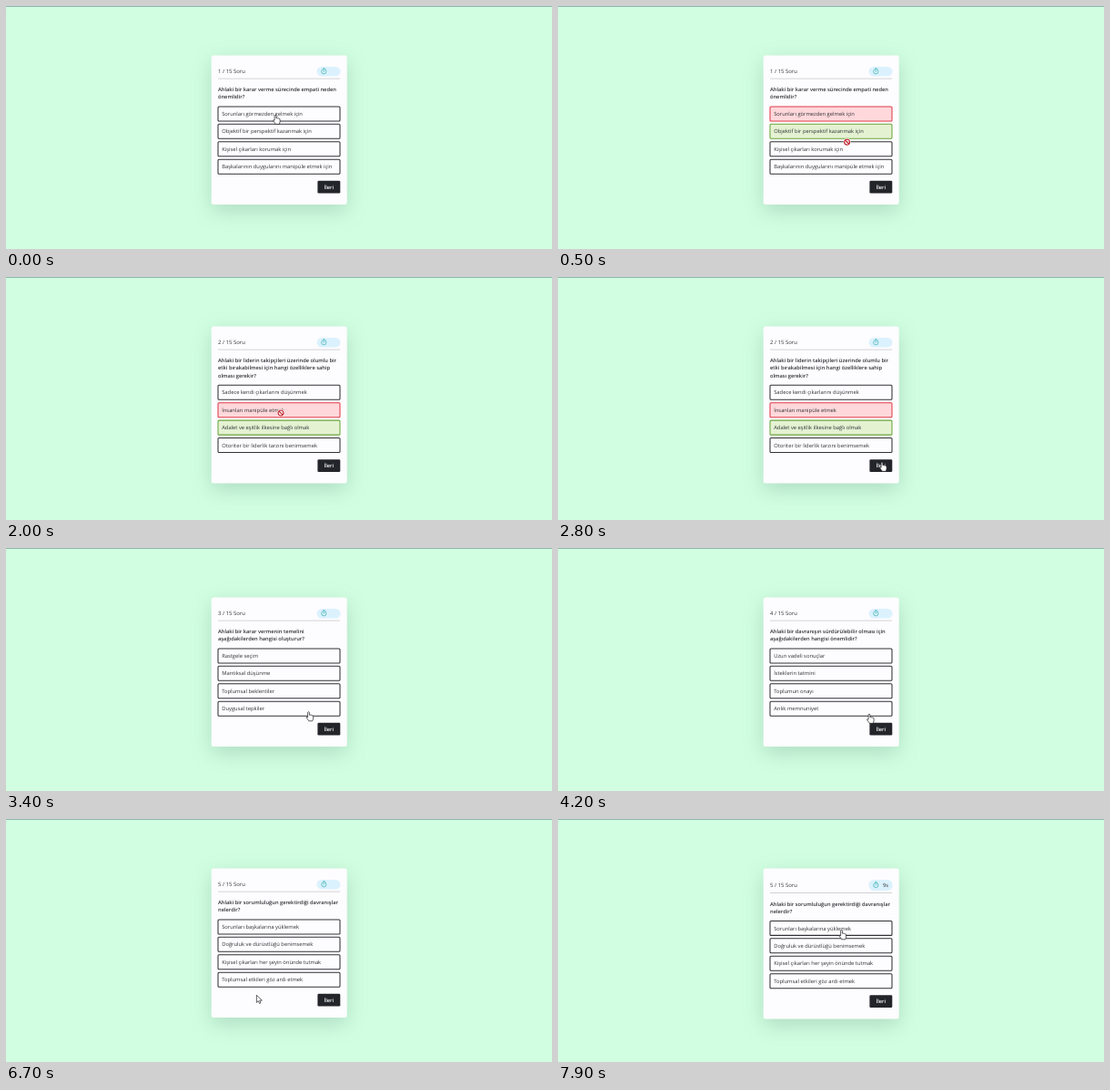
An HTML page that plays this animation: 600x268 px, repeating every 8000 ms.

```html
<!DOCTYPE html>
<html lang="tr">
<head>
<meta charset="utf-8">
<title>Soru</title>
<style>
  html, body { margin: 0; width: 100%; height: 100%; overflow: hidden; background: #d1fee1; }
  svg { display: block; width: 100%; height: 100%; }
  text { font: 5.8px 'Open Sans', 'Noto Sans', sans-serif; fill: #303136; text-rendering: geometricPrecision; }
  .bold { font-weight: 600; font-size: 5.73px; }
  .card { fill: #fdfcfe; filter: drop-shadow(0 7px 11px rgba(50, 100, 85, .21)); }
  .option { fill: #fdfcfe; stroke: #303136; stroke-width: 1.05; }
  .wrong { fill: #ffd8db; stroke: #e03b4a; }
  .right { fill: #e4f2d2; stroke: #6ba53d; }
  .button { fill: #24252b; }
  .cursor { fill: #fff; stroke: #1d1d22; stroke-width: .7; stroke-linejoin: round; }
  .blocked { fill: none; stroke: #c3272f; stroke-width: 1.2; }
  .halo { stroke: #fff; stroke-width: 2.2; }
  .watch { fill: none; stroke: #35aead; stroke-width: .7; }
</style>
</head>
<body>
<svg id="stage" viewBox="0 0 600 268"></svg>
<script>
const LOOP = 8000, STEP = 100;
const LEFT = 233, WIDTH = 134, LINE = 8.4, PITCH = 19.42, OPTION_HEIGHT = 16;
const BUTTON = { x: 342.4, w: 24.9, h: 13.8 };

// answered: time of the click; picked and correct: option indexes
const questions = [
  { start: 0, answered: 100, picked: 0, correct: 1,
    lines: ['Ahlaki bir karar verme sürecinde empati neden', 'önemlidir?'],
    options: ['Sorunları görmezden gelmek için', 'Objektif bir perspektif kazanmak için',
              'Kişisel çıkarları korumak için', 'Başkalarının duygularını manipüle etmek için'] },
  { start: 1400, answered: 2000, picked: 1, correct: 2,
    lines: ['Ahlaki bir liderin takipçileri üzerinde olumlu bir',
            'etki bırakabilmesi için hangi özelliklere sahip', 'olması gerekir?'],
    options: ['Sadece kendi çıkarlarını düşünmek', 'İnsanları manipüle etmek',
              'Adalet ve eşitlik ilkesine bağlı olmak', 'Otoriter bir liderlik tarzını benimsemek'] },
  { start: 2900, answered: 3700, picked: 1, correct: 1,
    lines: ['Ahlaki bir karar vermenin temelini', 'aşağıdakilerden hangisi oluşturur?'],
    options: ['Rastgele seçim', 'Mantıksal düşünme', 'Toplumsal beklentiler', 'Duygusal tepkiler'] },
  { start: 4100, answered: 4900, picked: 1, correct: 0,
    lines: ['Ahlaki bir davranışın sürdürülebilir olması için', 'aşağıdakilerden hangisi önemlidir?'],
    options: ['Uzun vadeli sonuçlar', 'İsteklerin tatmini', 'Toplumun onayı', 'Anlık memnuniyet'] },
  { start: 5900, answered: Infinity,
    lines: ['Ahlaki bir sorumluluğun gerektirdiği davranışlar', 'nelerdir?'],
    options: ['Sorunları başkalarına yüklemek', 'Doğruluk ve dürüstlüğü benimsemek',
              'Kişisel çıkarları her şeyin önünde tutmak', 'Toplumsal etkileri göz ardı etmek'] }
];

// The pointer travels between options and the button, easing at each stop.
const press = [356, 204];
const stops = [
  { t: 0, at: [296, 120] },
  { t: 1200, at: [353.5, 200] },
  { t: 1400, at: [353.5, 200] },
  { t: 1900, at: [302, 150] },
  { t: 2000, at: [302, 150] },
  { t: 2800, at: press },
  { t: 3400, at: [332.5, 180.5] },
  { t: 3700, at: [305, 138] },
  { t: 4100, at: press },
  { t: 4200, at: [342, 183] },
  { t: 4800, at: [250, 135] },
  { t: 5300, at: [368, 219] },
  { t: 5600, at: press },
  { t: 5900, at: press },
  { t: 6900, at: [266, 193] },
  { t: 7400, at: [311.5, 122.5] },
  { t: LOOP, at: [311.5, 122.5] }
];

function pointerAt(t) {
  const i = stops.findIndex(stop => stop.t > t);
  const from = stops[i - 1], to = stops[i];
  const u = (t - from.t) / (to.t - from.t), eased = u * u * (3 - 2 * u);
  return from.at.map((start, axis) => start + (to.at[axis] - start) * eased);
}

const rect = (x, y, w, h, r, attrs) =>
  `<rect x="${x}" y="${y}" width="${w}" height="${h}" rx="${r}" ${attrs}/>`;
const label = (x, y, s, attrs = '') => `<text x="${x}" y="${y}" ${attrs}>${s}</text>`;
const inside = (px, py, x, y, w, h) => px > x && px < x + w && py > y && py < y + h;

const noEntry = 'M-2.2-2.2L2.2 2.2M-3 0A3 3 0 1 0 3 0A3 3 0 1 0-3 0';
const cursors = {
  arrow: '<path class="cursor" d="M0 0V8.2L1.9 6.5L3.2 9.3L4.6 8.7L3.4 6H6Z"/>',
  hand: `<path class="cursor" d="M-.9 .7Q0-.6 .9 .7V3.7Q1.9 3 2.5 3.9Q3.4 3.4 4 4.3Q5.1 4 5.1 5.2
    V7.4Q5 9 4.2 10.3H.3Q-.8 8.4-2.4 6.7Q-2.7 5.2-.9 6.2Z"/>`,
  blocked: `<path class="blocked halo" d="${noEntry}"/><path class="blocked" d="${noEntry}"/>`
};

const stopwatch = y => `<g class="watch" transform="translate(349.3 ${y})">
  <circle r="2.6"/><path d="M0 .3V-1.5M-.9-3.6H.9M0-3.6V-2.6M2-2.5L2.6-3.1"/></g>`;

function header(index, ticks, shift) {
  return label(LEFT, 74.2 + shift / 2, `${index + 1} / 15 Soru`, 'style="font-size:5.95px"')
    + rect(341.5, 67, 26, 10.4 + shift, 5.5, 'fill="#dbf2fe"')
    + stopwatch(72.3 + shift / 2)
    + (ticks ? label(363, 75, `${11 - ticks}s`, 'text-anchor="end"') : '')
    + rect(LEFT, 79.7 + shift, WIDTH, .8, 0, 'fill="#c9c9ce"');
}

function scene(t) {
  const index = questions.findLastIndex(q => t >= q.start);
  const q = questions[index];
  const answered = t >= q.answered;
  // The countdown appears about a second after a question opens and makes the header taller.
  const ticks = answered ? 0 : Math.floor((t - q.start + 100) / 1000);
  const shift = ticks ? 1.5 : 0;
  const firstOption = 94.1 + shift + q.lines.length * LINE;
  const optionTop = i => firstOption + i * PITCH;
  const buttonTop = firstOption + 81.9;

  let out = rect(0, 0, 600, 1, 0, 'fill="#8cb5ad"')
    + rect(225.7, 54.5, 149, buttonTop - 28.3, 2.5, 'class="card"')
    + header(index, ticks, shift);

  q.lines.forEach((line, i) => out += label(LEFT, 94 + shift + i * LINE, line, 'class="bold"'));

  q.options.forEach((option, i) => {
    const state = !answered ? '' : i === q.correct ? 'right' : i === q.picked ? 'wrong' : '';
    out += rect(LEFT, optionTop(i), WIDTH, OPTION_HEIGHT, 1, `class="option ${state}"`)
      + label(237.2, optionTop(i) + 10.1, option);
  });

  out += rect(BUTTON.x, buttonTop, BUTTON.w, BUTTON.h, 1.3, 'class="button"')
    + label(BUTTON.x + BUTTON.w / 2, buttonTop + 9, 'İleri',
        'class="bold" text-anchor="middle" style="fill:#fff"');

  const [x, y] = pointerAt(t);
  const overOption = q.options.some((_, i) => inside(x, y, LEFT, optionTop(i), WIDTH, OPTION_HEIGHT));
  const overButton = index > 0 && inside(x, y, BUTTON.x, buttonTop, BUTTON.w, BUTTON.h);
  const kind = overOption && answered ? 'blocked' : overOption || overButton ? 'hand' : 'arrow';
  return out + `<g transform="translate(${x} ${y})">${cursors[kind]}</g>`;
}

const stage = document.getElementById('stage');
const begin = performance.now();
let shown = -1;

function draw() {
  const t = Math.floor((performance.now() - begin) % LOOP / STEP) * STEP;
  if (t !== shown) stage.innerHTML = scene(shown = t);
  requestAnimationFrame(draw);
}
draw();
</script>
</body>
</html>
```
